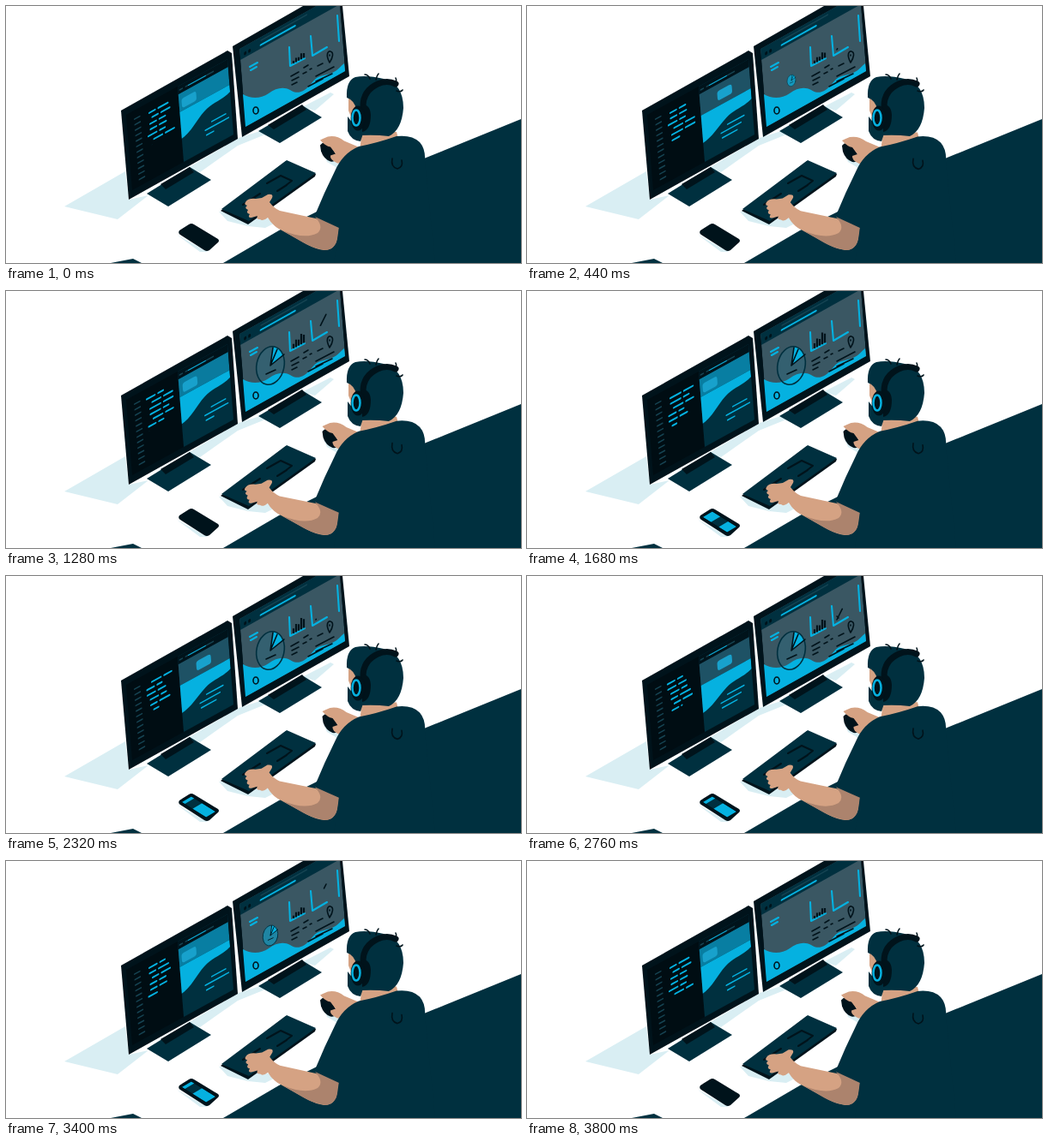
An HTML page that plays this animation: 600x300 px, repeating every 3.84 s.

```html
<!DOCTYPE html>
<html>
<head>
<meta charset="utf-8">
<style>
html, body { margin: 0; width: 100%; height: 100%; overflow: hidden; background: #fff }
svg { display: block; width: 600px; height: 300px }
.navy { fill: #00303f } .ink { fill: #00131b } .cyan { fill: #05b1e0 } .steel { fill: #3a5763 }
.shade { fill: #d9eef3 } .skin { fill: #d5a283 } .tan { fill: #ac836d }
.line { fill: none; stroke-linecap: round; stroke-linejoin: round; stroke-width: 1.6 }
.thin { stroke-width: 1 } .bold { stroke-width: 2.1 }
.c { stroke: #05b1e0 } .k { stroke: #00131b } .g { stroke: #164453 }
</style>
</head>
<body>
<svg viewBox="0 0 600 300">
  <defs>
    <clipPath id="pageClip"><path d="M60 0H118V88H60z"/></clipPath>
    <clipPath id="codeClip"><path d="M20 8H57V49H20z"/></clipPath>
    <clipPath id="screenClip"><path d="M0 0H116V91H0z"/></clipPath>
    <clipPath id="phoneClip"><path d="M0 0H1V1H0z"/></clipPath>
  </defs>

  <!-- desk, floor and shadows -->
  <path class="shade" d="M68 234L139 193L143 226L166 221L130 249zM212 189L271 154L296 146L302 150L270 163L226 194zM345 118L378 101L382 103L360 122zM248 240L258 251L282 257L302 259L316 252L290 242zM199 267L226 287L235 287zM370 173L374 182L386 189L391 181z"/>
  <path class="navy" d="M253 300L318 262L487 178L600 132V300z"/>
  <path class="navy" d="M122 300L148 295L158 300z"/>

  <!-- left monitor -->
  <path class="navy" d="M164 219L214 188L239 203L189 234z"/>
  <path class="ink" d="M180 208L214 188L219 194L186 214z"/>
  <path class="ink" d="M134 122L258 52L263 55L270 155L143 226z"/>
  <g transform="matrix(1 -.55 .08 1 140 127)">
    <path fill="#000d13" d="M0 0H60V88H0z"/>
    <path class="navy" d="M60 0H118V88H60z"/>
    <path id="menu" class="line g"/>
    <path id="code" class="line bold c" clip-path="url(#codeClip)"/>
    <g clip-path="url(#pageClip)">
      <path id="strip"/>
      <path id="hill" class="cyan"/>
      <rect id="card" width="17" height="11" rx="3" fill="#18a1cc"/>
      <path class="ink" d="M59 0H118V9H59z"/>
      <path class="line g" d="M62 5h3M69 5h32"/>
      <path class="line thin c" d="M72 5h20"/>
      <path id="captions" class="line c"/>
    </g>
  </g>

  <!-- right monitor -->
  <path class="navy" d="M294 146L345 116L368 130L319 160z"/>
  <path class="ink" d="M305 139L345 115L350 121L312 144z"/>
  <path class="ink" d="M264 47L346 0H392L400 82L275 153z"/>
  <g transform="matrix(1 -.56 .08 1 272 50)" clip-path="url(#screenClip)">
    <path class="steel" d="M0 0H116V91H0z"/>
    <path class="navy" d="M0 0H116V13H0z"/>
    <path class="line k" d="M6 8v1M11 8v1" style="stroke-width:3"/>
    <path class="line bold c" d="M24 9H64"/>
    <path class="line g" d="M25 4H78"/>
  </g>
  <path class="cyan" d="M276 103C286 109 297 108 306 102C315 95 324 94 331 98C340 104 348 100 356 90C364 79 372 82 380 78C387 75 390 70 394 67L395 76L279 141z"/>
  <path class="line bold c" d="M386 11L388 41M284 71L293 66M285 75L292 71M330 48L331 70L348 61M355 35L357 58L374 48"/>
  <path class="line k" d="M332 82L341 77M333 87L341 83M333 92L339 89M346 79L350 77M347 72L352 69M354 74L356 73M363 70L369 67M361 82L382 71M361 88L380 79M352 94L369 85"/>
  <ellipse class="line k" cx="291" cy="122" rx="3" ry="4"/>
  <path class="line k" d="M377 66C372 57 375 52 378 53C382 54 381 60 377 66zM377 57v1"/>
  <path id="bars" class="line k" style="stroke-width:2.2;stroke-linecap:butt"/>
  <path id="trend" class="line k"/>
  <g id="pie">
    <ellipse id="pieFill" class="cyan" rx="16" ry="22.5" transform="rotate(12)"/>
    <path class="cyan" d="M0 0L3 -22Q11 -22 15 -12z"/>
    <ellipse class="line" stroke="#00303f" rx="16" ry="22.5" transform="rotate(12)"/>
    <path class="line k" d="M3 -21L0 0L16 -13M0 0L8 -19M-5 10L6 5"/>
  </g>

  <!-- keyboard and phone -->
  <path class="ink" d="M250 239L326 181L361 196L360 199L282 255z"/>
  <path class="navy" d="M251 237L327 180L361 195L283 251z"/>
  <path class="line bold k" d="M304 207L320 198L333 204L324 211M316 216L327 209M276 232L296 219"/>
  <path class="ink" d="M202 262L213 255Q216 253 219 255L247 272Q249 274 247 276L237 285Q234 287 231 285L203 267Q200 265 202 262z"/>
  <g id="phone" transform="matrix(28 17.5 11 -6.5 205 264)" clip-path="url(#phoneClip)">
    <path class="navy" d="M0 0H1V1H0z"/>
    <path id="feed" class="cyan" d="M-.2 0H.34V1H-.2zM.66 0H1.4V1H.66z"/>
  </g>

  <!-- person -->
  <g id="mouseHand">
    <path class="ink" d="M367 163Q372 156 380 165L387 176Q386 183 379 182Q371 179 368 170z"/>
    <path class="skin" d="M367 157Q371 155 376 153Q386 151 395 158L414 166L397 184L387 184Q378 180 379 175L385 173L379 165Q373 164 367 157z"/>
  </g>
  <g id="typingHand">
    <path class="skin" d="M279 229Q282 224 291 225L298 224L305 220Q312 219 310 224L307 229Q312 236 319 239L361 248L387 261Q387 285 371 285Q361 284 350 278L316 259Q309 254 305 247Q299 252 296 249Q291 249 293 245L286 247Q281 247 284 243Q279 242 282 238Q277 236 281 233Q277 232 279 229z"/>
    <path class="tan" d="M322 262Q348 273 363 265Q371 258 360 246L388 259Q387 285 372 285Q358 283 346 276z"/>
  </g>
  <g id="body">
    <path class="skin" d="M411 147L455 147L457 155L411 168Q416 157 411 147z"/>
    <path class="navy" d="M411 164Q432 160 455 152Q473 150 482 159Q489 167 488 181L500 300H382L388 258L360 244Q371 217 383 193Q392 172 411 164z"/>
    <path class="line k" d="M450 178Q448 188 456 190Q463 188 461 180"/>
  </g>
  <path class="skin" d="M399 104L413 110L418 150L406 140L399 122z"/>
  <path class="navy" d="M398 129Q405 140 418 143L413 158Q402 157 398 146zM397 107Q396 87 407 83Q420 80 440 85Q463 91 463 119Q461 145 446 152Q430 150 414 151L409 122Q405 109 397 107z"/>
  <path class="line k" d="M424 85Q422 80 418 80M431 86Q432 81 434 79M452 92Q456 88 454 84M455 99Q460 101 462 98"/>
  <path class="line k" d="M416 117Q416 99 433 91Q444 86 454 91" style="stroke-width:7"/>
  <path class="ink" d="M414 115Q424 114 425 127Q425 145 415 147z"/>
  <ellipse class="ink" cx="410" cy="131" rx="8.500" ry="14.500"/>
  <ellipse class="line c" cx="408" cy="130.500" rx="4.500" ry="9" style="stroke-width:2.5"/>
</svg>
<script>
const LOOP = 3840, HALF = LOOP / 2, ROW_TIME = 320, ROWS = LOOP / ROW_TIME;
const $ = id => document.getElementById(id);
const draw = (id, d) => $(id).setAttribute('d', d);
const place = (id, value) => $(id).setAttribute('transform', value);
const ease = (t, from, to) => {
  const p = Math.min(1, Math.max(0, (t - from) / (to - from)));
  return p * p * (3 - 2 * p);
};
const mix = (a, b, p) => a + (b - a) * p;
const random = n => { const x = Math.sin(n * 91.7 + 4) * 4375.5; return x - Math.floor(x); };

draw('menu', Array.from({ length: 12 }, (_, i) => `M9 ${10 + i * 6.4}h6`).join(''));

// One row of code: two words, revealed up to the typed share.
function codeRow(index, y, typed) {
  const start = 23 + Math.floor(random(index) * 3) * 3;
  const first = 6 + random(index + 20) * 7, second = 5 + random(index + 40) * 6;
  const end = start + (first + second + 4) * typed;
  let d = `M${start} ${y}H${Math.min(start + first, end)}`;
  if (end > start + first + 4) d += `M${start + first + 4} ${y}H${end}`;
  return d;
}

function drawCode(t) {
  const step = Math.floor(t / ROW_TIME), part = t % ROW_TIME / ROW_TIME;
  const scroll = ease(part, 0, .3);
  let d = '';
  for (let i = 0; i < 7; i++) {
    d += codeRow((step + i) % ROWS, 12 + (i - scroll) * 6.4, i < 6 ? 1 : part);
  }
  draw('code', d);
}

function drawPage(t) {
  const p = ease(t, 160, 380) - ease(t, 1080, 1320);
  const top = mix(30, 34, p), low = mix(61, 66, p), end = mix(38, 46, p);
  $('strip').setAttribute('fill', `rgb(${mix(8, 30, p)},${mix(126, 82, p)},${mix(162, 101, p)})`);
  draw('strip', `M59 9H118V${top}H59z`);
  draw('hill', `M59 ${top}H118V${end}C108 ${end + 5} 98 ${end + 1} 88 ${end + 6}S71 ${low - 1} 59 ${low}z`);
  $('card').setAttribute('x', mix(63, 80, p));
  $('card').setAttribute('y', mix(16, 17, p));
  const x = mix(87, 81, p);
  draw('captions', `M${x} 66h${mix(27, 23, p)}M${x + 8} 60h${mix(16, 19, p)}M${x + 1} 72h${mix(8, 17, p)}`);
}

function drawCharts(t, half) {
  const grow = .5 + .5 * Math.sin(Math.PI * t / LOOP) ** 2;
  draw('bars', [6, 10, 8, 14, 11].map((h, i) =>
    `M${335 + i * 3} ${67 - i * 1.6}v${-h * grow}`).join(''));
  const from = ease(half, 900, 1720), to = ease(half, 300, 1350);
  const point = p => `${mix(361, 373, p)} ${mix(51, 27, p)}`;
  draw('trend', to - from > .02
    ? `M${point(from)}L${point(to)}` + (from < .3 && to > .2 ? 'M361 47L363 49' : '') : '');
  const size = ease(t, 280, 720) - ease(t, 3240, 3580);
  place('pie', `translate(308 87) scale(${size})`);
  $('pieFill').setAttribute('opacity', 1 - .9 * size);
}

function drawPerson(t) {
  const move = ease(t, 200, 760) - ease(t, 2840, 3360);
  place('mouseHand', `translate(${mix(-1, 1.5, move)} ${mix(-.5, 1, move)})`);
  const tap = Math.sin(2 * Math.PI * t / 480);
  place('typingHand', `rotate(${.6 * tap} 374 268)`);
  place('body', `translate(0 ${.4 * Math.sin(2 * Math.PI * t / HALF)})`);
}

function drawPhone(t) {
  $('phone').setAttribute('opacity', ease(t, 1400, 1520) - ease(t, 3560, 3680));
  place('feed', `translate(${-.22 * ease(t, 1640, 2040)} 0)`);
}

function frame(now) {
  const t = now % LOOP, half = t % HALF;
  drawCode(t);
  drawPage(half);
  drawCharts(t, half);
  drawPerson(t);
  drawPhone(t);
  requestAnimationFrame(frame);
}
requestAnimationFrame(frame);
</script>
</body>
</html>
```
